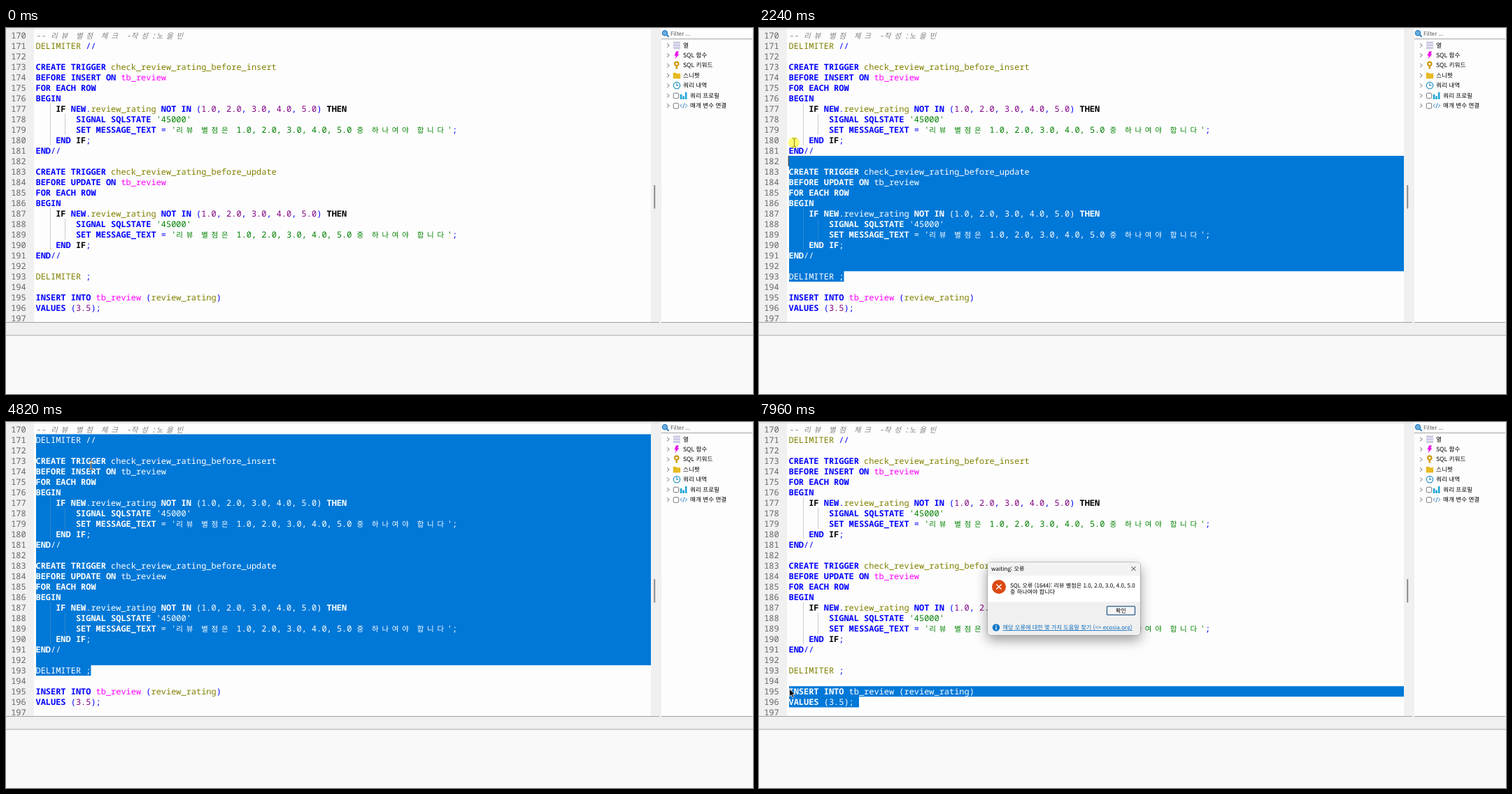
Recreate the animation shown at these times as an HTML page. Size 1068x524 px, loop 8000 ms.

```html
<!DOCTYPE html>
<html lang="ko">
<head>
<meta charset="utf-8">
<title>SQL editor</title>
<style>
  :root { --cell: 7.18px; --row: 15.03px; --ui: 'Noto Sans CJK KR', 'Noto Sans CJK JP', sans-serif; }
  html, body { margin: 0; width: 100%; height: 100%; overflow: hidden; background: #f0f0f0; }
  #stage { position: relative; width: 1068px; height: 524px; overflow: hidden; isolation: isolate; background: #f0f0f0;
    text-rendering: geometricPrecision; }
  #stage > * { position: absolute; }
  svg { overflow: visible; }
  svg text { font-family: var(--ui); white-space: pre; }
  #chrome { left: 0; top: 0; }

  #editor { left: 0; top: 0; width: 922px; height: 421px; overflow: hidden;
    font: 11.967px/var(--row) 'Noto Sans Mono', 'DejaVu Sans Mono', monospace; white-space: pre; }
  #numbers { position: absolute; left: 7.2px; top: 2.6px; color: #666; }
  .code { position: absolute; left: 42.5px; top: 2.6px; width: 879.5px; height: 418.4px; }
  .line { height: var(--row); }
  .code i { display: inline-block; width: calc(2 * var(--cell)); font: 10.5px/1 var(--ui); font-style: inherit; }
  .guide { position: absolute; width: 1px; background: #ccc; }
  .com { color: #808080; font-style: italic; }
  .str { color: #008000; }
  .num { color: #800080; }
  .tab { color: #f0f; }
  .ctl { color: #000; font-weight: bold; }
  .kw { color: #00f; font-weight: bold; }
  .id { color: #808000; }
  .sym { color: #00f; }
  #selected { background: #0078d7; }
  #selected span { color: #fff; }
  #selected .guide { background: #2f86cf; }

  #caret { left: 0; top: 0; width: 1.3px; height: var(--row); background: #fff; mix-blend-mode: difference; }
  #beam, #arrow, #halo { left: 0; top: 0; width: 1px; height: 1px; }
  #beam { mix-blend-mode: difference; }
  #halo { width: 16px; height: 16px; margin: -8px; border-radius: 50%; background: rgba(255, 245, 0, .55); }

  #dialog { left: 327px; top: 201px; width: 218px; height: 104px; border-radius: 4px; background: #f0f0f0;
    box-shadow: 0 0 0 .6px #999, 0 7px 18px rgba(0, 0, 0, .4); overflow: visible; }
  #dialog svg { position: absolute; left: 0; top: 0; }
</style>
</head>
<body>
<div id="stage">
  <svg id="chrome" width="1068" height="524">
    <rect x="40" width="882" height="421" fill="#fdfdfd"/>
    <rect y="1" width="934" height="1" fill="#e2e2e2"/>
    <rect x="926.3" y="225" width="1.9" height="33.5" fill="#858585"/>
    <rect x="937" y="1" width="130" height="420" fill="#fdfdfd"/>
    <path d="M937 15.7H1067M0 421.5H934M937 421.5H1067" stroke="#a0a0a0"/>
    <rect y="440" width="1068" height="84" fill="#f9f9f9"/>
    <path d="M0 440H1068" stroke="#a8a8a8"/>
    <g fill="none" stroke="#2f7fc1">
      <circle cx="942" cy="7.2" r="3.6" fill="#67aee0" stroke-width="1.3"/>
      <path d="M944.6 9.8l3 3" stroke-width="2"/>
    </g>
    <text x="950" y="11" font-size="8" fill="#555">Filter ...</text>
    <g fill="#cbc9e4">
      <rect x="954" y="19.5" width="10" height="3"/>
      <rect x="954" y="23.3" width="10" height="3"/>
      <rect x="954" y="27.1" width="10" height="3"/>
    </g>
    <path d="M958 33.5h4l-1.7 4h2.2l-6.2 7 1.6-4.8h-2.4z" fill="#e815e8"/>
    <path d="M957.6 53h2.4v5.6h-2.4z" fill="#cf9a12"/>
    <circle cx="958.8" cy="51.3" r="2.7" fill="none" stroke="#cf9a12" stroke-width="2.2"/>
    <path d="M953.8 64h4l1 1.3h5.4v7.2h-10.4z" fill="#e6b920"/>
    <g fill="none" stroke="#1c8fbd" stroke-width="1.2">
      <circle cx="959" cy="82.3" r="4.7"/>
      <path d="M959 79.3v3.2h2.4"/>
    </g>
    <g fill="#fff" stroke="#666" stroke-width=".9">
      <rect x="954.3" y="93.3" width="7.4" height="7.4" rx="1.4"/>
      <rect x="954.3" y="107.8" width="7.4" height="7.4" rx="1.4"/>
    </g>
    <path d="M963.8 95h2.6v7h-2.6zM967.3 97.5h2.6v4.5h-2.6zM970.9 92h2.6v10h-2.6z" fill="#1fa5d6"/>
    <path d="M966.6 108.7l-2.6 2.5 2.6 2.5M970 107.6l-2 7.2M971.2 108.7l2.6 2.5-2.6 2.5" fill="none" stroke="#3a86c4"/>
    <g id="tree" font-size="8.6"></g>
  </svg>

  <div id="editor">
    <div id="numbers"></div>
    <div id="plain" class="code"></div>
    <div id="selected" class="code"></div>
  </div>

  <div id="dialog">
    <svg width="218" height="104" font-size="8.1">
      <path d="M0 19V4a4 4 0 0 1 4-4H214a4 4 0 0 1 4 4V19z" fill="#f3f3f3"/>
      <rect y="19" width="218" height="37.5" fill="#fff"/>
      <text x="5" y="12">waiting: 오류</text>
      <path d="M205.5 6l6 6m0-6l-6 6" stroke="#222" stroke-width=".9"/>
      <circle cx="16" cy="35" r="10" fill="#dc4a14"/>
      <path d="M12.4 31.4l7.2 7.2m0-7.2l-7.2 7.2" stroke="#fff" stroke-width="1.4"/>
      <text x="32" y="35.5">SQL 오류 (1644): 리뷰 별점은 1.0, 2.0, 3.0, 4.0, 5.0</text>
      <text x="32" y="45">중 하나여야 합니다</text>
      <rect x="170.5" y="62.8" width="40" height="12.4" rx="1" fill="#f4f4f4" stroke="#2b5f8c" stroke-width="1.3"/>
      <text x="190.5" y="71.8" text-anchor="middle">확인</text>
      <circle cx="12" cy="93.3" r="5.2" fill="#0f78c8"/>
      <path d="M12 92.3v4M12 89.8v1.4" stroke="#fff" stroke-width="1.3"/>
      <text x="21.5" y="96" font-size="8.2" fill="#0a6cbd" text-decoration="underline">해당 오류에 대한 몇 가지 도움말 찾기 (=&gt; ecosia.org)</text>
    </svg>
  </div>

  <div id="caret"></div>
  <svg id="beam"><path d="M-3 -6h2.2l.8 .8 .8-.8h2.2M0 -5.4v11M-3 6h2.2l.8-.8 .8 .8h2.2" fill="none" stroke="#fff"/></svg>
  <svg id="arrow"><path d="M0 0v11l2.6-2.4 1.8 4 1.9-.9-1.8-3.8h3.5z" stroke="#fff" stroke-width=".8"/></svg>
  <div id="halo"></div>
</div>

<script>
const LOOP = 8000, CELL = 7.18, ROW = 15.03, LEFT = 42.5, TOP = 2.6, WIDTH = 879.5, FIRST = 170, LAG = 70;
const $ = id => document.getElementById(id);

const trigger = kind => `CREATE TRIGGER check_review_rating_before_${kind}
BEFORE ${kind.toUpperCase()} ON tb_review
FOR EACH ROW
BEGIN
    IF NEW.review_rating NOT IN (1.0, 2.0, 3.0, 4.0, 5.0) THEN
        SIGNAL SQLSTATE '45000'
        SET MESSAGE_TEXT = '리뷰 별점은 1.0, 2.0, 3.0, 4.0, 5.0 중 하나여야 합니다';
    END IF;
END//
`;
const lines = [
  '-- 리뷰 별점 체크 -작성:노을빈', 'DELIMITER //', '',
  ...trigger('insert').split('\n'), ...trigger('update').split('\n'),
  'DELIMITER ;', '', 'INSERT INTO tb_review (review_rating)', 'VALUES (3.5); ', ''
];

const TOKEN = /(--.*)|('[^']*')|(\d+\.\d+)|(\btb_review\b)|(\b(?:IF|THEN)\b)|(DELIMITER|[a-z]\w*)|([A-Z]\w*)|([^\s\w])/g;
const KINDS = ['com', 'str', 'num', 'tab', 'ctl', 'id', 'kw', 'sym'];
const HANGUL = /[가-힣]/g;
const paint = line => line.replace(TOKEN, (text, ...groups) => {
  const kind = KINDS[groups.findIndex(g => g !== undefined)];
  return `<span class="${kind}">${text.replace(HANGUL, '<i>$&</i>')}</span>`;
});
const guide = (col, row, rows) =>
  `<div class="guide" style="left:${col * CELL - .5}px;top:${(row - FIRST) * ROW}px;height:${rows * ROW}px"></div>`;

const guides = [177, 187].map(row => guide(2.9, row, 4) + guide(5.9, row + 1, 2)).join('');
$('plain').innerHTML = $('selected').innerHTML =
  lines.map(l => `<div class="line">${paint(l)}</div>`).join('') + guides;
$('numbers').innerHTML = lines.map((_, i) => `<div class="line">${FIRST + i}</div>`).join('');
$('tree').innerHTML = ['열', 'SQL 함수', 'SQL 키워드', '스니펫', '쿼리 내역', '쿼리 프로필', '매개 변수 연결'].map((label, i) => {
  const y = 24.6 + 14.4 * i;
  return `<path d="M945.3 ${y - 2.6}l2.8 2.8-2.8 2.8" fill="none" stroke="#666"/>
    <text x="${i < 5 ? 968 : 978}" y="${y + 3}">${label}</text>`;
}).join('');

// Pointer path: time, x, y
const path = [
  [130, 985, 516], [330, 740, 330], [530, 460, 214], [700, 240, 232], [890, 104, 309], [1050, 102, 318],
  [1630, 134, 359.5], [1900, 134, 359.5], [1970, 108, 300], [2030, 70, 226], [2100, 64, 210], [2300, 44, 145],
  [2500, 18, 45], [2590, 17, 39.5], [2660, 18, 31], [4819, 18, 31], [4820, 121, 62], [5080, 175, 190],
  [5380, 188, 358], [5560, 187, 366.5], [5620, 171, 382], [5760, 157, 402], [5900, 157, 402],
  [6300, 92, 398], [6700, 43, 382]
];
const presses = [[1900, 3000], [5490, 5570], [5900, 6770]];
const drags = [{ from: 1900, to: 3000, until: 5490 }, { from: 5900, to: 6770, until: LOOP }];
const caretOn = [[1900, 2040], [2160, 3290], [3810, 4360], [4890, 5420], [5490, 6840], [7430, 7960]];

const clamp = (v, lo, hi) => Math.min(Math.max(v, lo), hi);
const within = (t, [a, b]) => t >= a && t < b;

function pointer(t) {
  const i = path.findIndex(k => k[0] > t);
  if (i < 0) return path[path.length - 1].slice(1);
  if (i === 0) return path[0].slice(1);
  const [a, b] = [path[i - 1], path[i]], u = (t - a[0]) / (b[0] - a[0]);
  return [a[1] + (b[1] - a[1]) * u, a[2] + (b[2] - a[2]) * u];
}

function cellAt([x, y]) {
  const row = clamp(Math.floor((y - TOP) / ROW), 0, lines.length - 1);
  const cells = lines[row].replace(HANGUL, '00').length;
  return { row, col: clamp(Math.round((x - LEFT) / CELL), 0, cells) };
}

function selectionClip(a, b) {
  const [s, e] = a.row < b.row || (a.row === b.row && a.col < b.col) ? [a, b] : [b, a];
  const x1 = s.col * CELL, x2 = e.col * CELL, y1 = s.row * ROW, y2 = e.row * ROW;
  const points = [[x1, y1], [WIDTH, y1], [WIDTH, y2], [x2, y2], [x2, y2 + ROW], [0, y2 + ROW], [0, y1 + ROW], [x1, y1 + ROW]];
  return `polygon(${points.map(p => p.map(v => v.toFixed(2) + 'px').join(' ')).join(',')})`;
}

const show = (id, on) => { $(id).style.visibility = on ? 'visible' : 'hidden'; };
const move = (id, x, y, scale = 1) => { $(id).style.transform = `translate(${x}px,${y}px) scale(${scale})`; };

function draw(t) {
  const [x, y] = pointer(t);
  const isArrow = y > 421 || x > 922 || t >= 7030;
  show('beam', t >= 130 && !isArrow);
  show('arrow', t >= 130 && isArrow);
  move('beam', Math.round(x) + .5, Math.round(y));
  move('arrow', x + .5, y);

  const press = presses.find(([a, b]) => within(t, [a, b + 120]));
  const fade = press ? clamp((t - press[1] + 40) / 160, 0, 1) : 1;
  $('halo').style.opacity = 1 - fade;
  move('halo', x, y, 1 + .25 * fade);

  const drag = drags.find(d => within(t, [d.from, d.until]));
  let focus = { row: 194 - FIRST, col: 0 };
  if (drag) {
    focus = cellAt(pointer(clamp(t - LAG, drag.from, drag.to)));
    $('selected').style.clipPath = selectionClip(cellAt(pointer(drag.from)), focus);
  }
  show('selected', drag);
  show('caret', caretOn.some(span => within(t, span)));
  move('caret', LEFT - .8 + focus.col * CELL, TOP + focus.row * ROW);

  const open = clamp((t - 7790) / 150, 0, 1);
  show('dialog', t >= 7830);
  $('dialog').style.opacity = open;
  $('dialog').style.transform = `scale(${.94 + .06 * open})`;
}

const start = performance.now();
function tick() {
  draw((performance.now() - start) % LOOP);
  requestAnimationFrame(tick);
}
tick();
</script>
</body>
</html>
```
